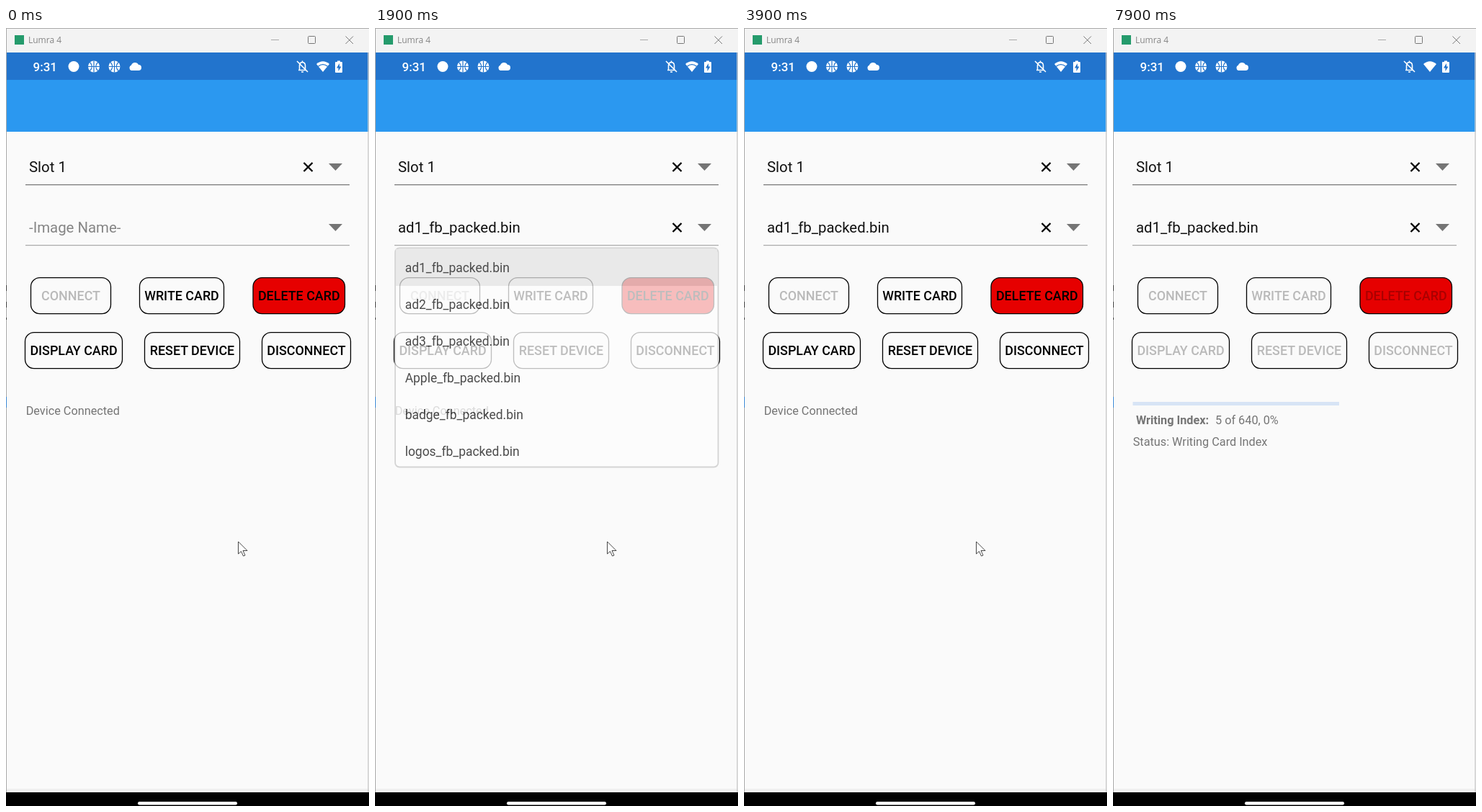
Animation of 504x1080 px, one loop 8 s. Source, as an HTML page:

```html
<!DOCTYPE html>
<html lang="en">
<meta charset="utf-8">
<title>Card writer</title>
<style>
  html, body { margin: 0; width: 100%; height: 100%; overflow: hidden; background: #fafafa; }
  svg { display: block; width: 504px; height: 1080px; }
  text { font-family: Roboto, sans-serif; font-size: 16.25px; fill: #757575; white-space: pre; }
  .field { font-size: 20.4px; fill: #111; }
  .item { font-size: 17.45px; fill: #111; }
  .label { font-size: 17.9px; font-weight: 500; fill: #000; text-anchor: middle; }
  .line { fill: none; stroke: #fff; stroke-width: 1.6; }
</style>
<svg viewBox="0 0 504 1080">
  <defs>
    <g id="clear"><path d="M-6-6 6 6M6-6-6 6" stroke="#000" stroke-width="2.3"/></g>
    <path id="arrow" d="M-9.5-5h19L0 5z" fill="#757575"/>
    <g id="ball">
      <circle r="8" fill="#fff"/>
      <path d="M0-8V8M-8 0H8M-5.5-6Q0 0-5.5 6M5.5-6Q0 0 5.5 6" fill="none" stroke="#2274cd" stroke-width="1.2"/>
    </g>
  </defs>

  <!-- window frame -->
  <rect width="504" height="1080" fill="#fafafa"/>
  <rect width="504" height="34" fill="#f3f3f3"/>
  <rect x="12" y="10" width="13" height="13" fill="#259b6c"/>
  <text x="31" y="21" style="font:12px 'Open Sans',sans-serif;fill:#858585">Lumra 4</text>
  <g fill="none" stroke="#777">
    <path d="M368 16.5h11" stroke="#aaa"/>
    <rect x="419.5" y="11.5" width="10" height="10" rx="1"/>
    <path d="M471.500 11.500l10.500 10.500M482 11.500l-10.500 10.500"/>
  </g>

  <!-- status bar -->
  <rect y="34" width="504" height="38" fill="#2274cd"/>
  <rect y="72" width="504" height="72" fill="#2b98f0"/>
  <text x="37.500" y="59.500" style="font-size:17px;font-weight:500;fill:#fff">9:31</text>
  <circle cx="94" cy="53.500" r="7.500" fill="#fff"/>
  <use href="#ball" x="122" y="53.500"/>
  <use href="#ball" x="150.500" y="53.500"/>
  <path d="M174 59a4 4 0 0 1 0-7.500a5.500 5.500 0 0 1 10-.5a4 4 0 0 1 0 8z" fill="#fff"/>
  <path class="line" d="M406 58.500h11M407.500 58v-6q0-4 4-4.500q4 .5 4 4.500v6M411.500 45.500v2M410 61h3M404 46l15 15"/>
  <path d="M431 50Q440 42.500 449 50L440 61z" fill="#fff"/>
  <path id="wifiGap" class="line" d="M433.500 53.300Q440 48 446.500 53.300" style="stroke:#2274cd;stroke-width:1.3"/>
  <path d="M460 45.500h4v1.500h2q1 0 1 1v13q0 1-1 1h-8q-1 0-1-1v-13q0-1 1-1h2z" fill="#fff"/>
  <path d="M463 49l-4 6.500h2.500v4.500l4-6.500h-2.500z" fill="#2274cd"/>

  <!-- form -->
  <text class="field" x="32" y="199.500">Slot 1</text>
  <use href="#clear" x="419.500" y="193"/>
  <use href="#arrow" x="457.500" y="193"/>
  <path d="M27 217.700h450" stroke="#777" stroke-width="1.300"/>
  <text id="image" class="field" x="32" y="283.700"></text>
  <use id="imageClear" href="#clear" x="419.500" y="277"/>
  <use href="#arrow" x="457.500" y="277"/>
  <path d="M27 301.700h450" stroke="#aaa" stroke-width="1.300"/>
  <g id="buttons"></g>
  <rect id="ripple" x="186" y="347" width="117" height="49" rx="12"/>
  <g id="progress">
    <rect x="27.500" y="519" width="286.500" height="5" fill="#d7e4f5"/>
    <text x="32" y="550" font-weight="700">Writing Index:</text>
    <text id="count" x="142" y="550"></text>
  </g>
  <text id="status" x="27.700"></text>
  <g id="popup">
    <rect x="28" y="305.500" width="448.500" height="304" rx="6" fill="#fdfdfd" stroke="#c8c8c8" stroke-width="1.800"/>
    <rect id="pressed" x="29" y="307" width="446" height="51" fill="#e4e4e4"/>
    <g id="items"></g>
  </g>

  <!-- lower edge and borders -->
  <rect y="1056" width="504" height="5" fill="#f0f0f0"/>
  <rect y="1061" width="504" height="19" fill="#000"/>
  <rect x="183" y="1074" width="138" height="4.500" rx="2.200" fill="#fff"/>
  <path d="M0 .5H504M.5 0V1061" stroke="#aaa"/>
  <path d="M503 34V1061" stroke="#ccc" stroke-width="1.500"/>
  <path d="M.5 357v8m0 15v8m0 14v3" stroke="#444"/>
  <path d="M.5 512v15" stroke="#3c8ad8"/>
  <path id="cursor" d="M0 0V17L4 13.500 7 20 9.500 19 6.500 12.500H12.500z" fill="#fff" stroke="#333" stroke-width=".9"/>
</svg>
<script>
const $ = id => document.getElementById(id);
const clamp = v => Math.min(1, Math.max(0, v));
const show = (id, on) => $(id).setAttribute('visibility', on ? 'visible' : 'hidden');
const DURATION = 8000, STEP = 100;

const buttons = [
  ['CONNECT', 34, 346, 112], ['WRITE CARD', 185, 346, 118], ['DELETE CARD', 342.5, 346, 128.5],
  ['DISPLAY CARD', 26, 422, 136], ['RESET DEVICE', 192, 422, 133], ['DISCONNECT', 355, 422, 124]
];
$('buttons').innerHTML = buttons.map(([label, x, y, w]) => `
  <rect x="${x + .5}" y="${y + .6}" width="${w - 1}" height="50" rx="12.5"
    fill="${label == 'DELETE CARD' ? '#e60000' : '#fafafa'}" stroke="#000" stroke-width="1.3"/>
  <text class="label" x="${x + w / 2}" y="${y + 32}">${label}</text>`).join('');
const labels = [...document.querySelectorAll('.label')];

$('items').innerHTML = ['ad1', 'ad2', 'ad3', 'Apple', 'badge', 'logos'].map((name, i) =>
  `<text class="item" x="41.7" y="${338.500 + 51 * i}">${name}_fb_packed.bin</text>`).join('');

// time, x, y of the pointer tip
const pointerPath = [[4800, 322.5, 713], [5600, 279, 737], [5800, 279, 737], [6200, 496.5, 835]];
function pointerAt(t) {
  let [, x, y] = pointerPath[0];
  for (let i = 1; i < pointerPath.length; i++) {
    const [t0, x0, y0] = pointerPath[i - 1], [t1, x1, y1] = pointerPath[i];
    const p = clamp((t - t0) / (t1 - t0));
    if (t > t0) { x = x0 + (x1 - x0) * p; y = y0 + (y1 - y0) * p; }
  }
  return `translate(${x} ${y})`;
}

const wifiFull = [[2000, 2700], [3200, 3600], [4900, 5500], [7700, DURATION]];

function draw(time) {
  const t = Math.floor(time % DURATION / STEP) * STEP;
  const picked = t >= 1900, busy = t >= 4200, writing = t >= 7600;

  show('wifiGap', !wifiFull.some(([a, b]) => t >= a && t < b));
  $('image').textContent = picked ? 'ad1_fb_packed.bin' : '-Image Name-';
  $('image').style.fill = picked ? '#111' : '#858585';
  show('imageClear', picked);

  const enter = clamp((t - 650) / 220), leave = clamp((t - 1850) / 200);
  const scale = .9 + .1 * enter;
  $('popup').setAttribute('opacity', enter * (1 - leave));
  $('popup').setAttribute('transform', `translate(252 305) scale(${scale}) translate(-252 -305)`);
  show('pressed', t >= 1800);

  labels.forEach((label, i) => label.style.fillOpacity = busy || !i ? .26 : 1);
  $('ripple').setAttribute('opacity', t < 4100 ? 0 : .15 * clamp((4700 - t) / 400));
  show('progress', busy);
  $('count').textContent = writing ? `${2 + (t - 7600) / 100} of 640, 0%` : '0 of 0, 0%';
  $('status').textContent = writing ? 'Status: Writing Card Index' : 'Device Connected';
  $('status').setAttribute('y', busy ? 579.8 : 537);

  $('cursor').setAttribute('transform', pointerAt(t));
  show('cursor', t < 6400);
}

function tick() {
  draw(performance.now());
  requestAnimationFrame(tick);
}
tick();
</script>
</html>
```
